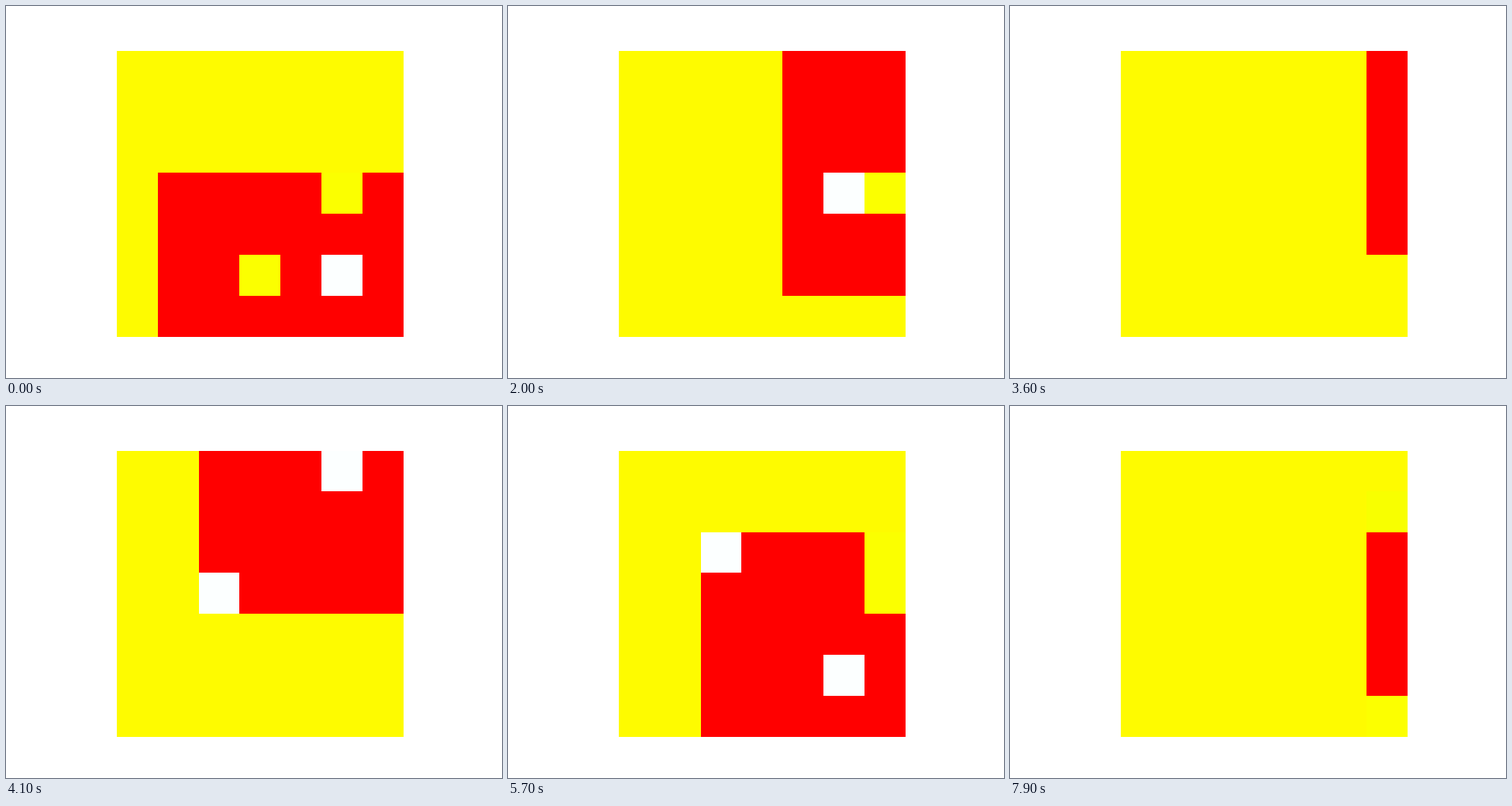
An HTML page with a canvas for the animation above (8000 ms loop, 640 by 480 pixels).

```html
<!DOCTYPE html>
<html>
<head>
<meta charset="utf-8">
<style>
html, body { margin: 0; width: 100%; height: 100%; overflow: hidden; background: #fff; }
canvas { display: block; }
</style>
</head>
<body>
<canvas id="stage" width="640" height="480"></canvas>
<script>
// An agent walks a 6x6 room; the picture is its 7x7 view, facing left from the middle of the right edge.
const ctx = document.getElementById('stage').getContext('2d');
const STEP = 100, STEPS = 80, ROOM = 6;
const COLUMNS = [143, 196, 249, 301, 354, 407, 460, 513];
const ROWS = [58, 110, 163, 215, 268, 321, 374, 427];
const COLORS = {
  wall: '#fefb00', floor: '#ff0000', key: '#fbff00',
  goal: '#f8ff00', door: '#fcffff', open: '#fcff00'
};
const HEADINGS = [[1, 0], [0, 1], [-1, 0], [0, -1]];

// Moves: f forward, l / r turn, p pick up, t open a door, . nothing
const EPISODES = [
  { start: 0, moves: 'prffl.rfflfftflfpflftlffflff',
    things: { '2,1': 'key', '4,3': 'key', '2,3': 'door', '4,5': 'door', '6,6': 'goal' } },
  { start: 29, moves: 'frffffflf',
    things: { '6,6': 'goal' } },
  { start: 39, moves: 'rffflffffplfl.lffrfffflt' + 'lfrflffplfftllff',
    things: { '6,4': 'key', '5,6': 'key', '4,3': 'door', '1,6': 'door', '6,6': 'goal' } }
];

function play(step) {
  const { start, moves, things } = EPISODES.filter(e => e.start <= step).pop();
  const agent = { x: 1, y: 1, heading: 0, carried: null, things: { ...things } };
  for (const move of moves.slice(0, step - start)) {
    const [dx, dy] = HEADINGS[agent.heading];
    const ahead = [agent.x + dx, agent.y + dy];
    if (move === 'f') [agent.x, agent.y] = ahead;
    if (move === 'l') agent.heading = (agent.heading + 3) % 4;
    if (move === 'r') agent.heading = (agent.heading + 1) % 4;
    if (move === 'p') {
      agent.carried = agent.things[ahead];
      delete agent.things[ahead];
    }
    if (move === 't') {
      agent.things[ahead] = 'open';
      agent.carried = null;
    }
  }
  return agent;
}

function cellAt(agent, forward, right) {
  if (!forward && !right) return agent.carried || 'floor';
  const [dx, dy] = HEADINGS[agent.heading];
  const x = agent.x + forward * dx - right * dy;
  const y = agent.y + forward * dy + right * dx;
  if (Math.min(x, y) < 1 || Math.max(x, y) > ROOM) return 'wall';
  return agent.things[[x, y]] || 'floor';
}

function draw(step) {
  const agent = play(step);
  for (let row = 0; row < 7; row++) {
    for (let col = 0; col < 7; col++) {
      const x = COLUMNS[col], y = ROWS[row];
      ctx.fillStyle = COLORS[cellAt(agent, 6 - col, row - 3)];
      ctx.fillRect(x, y, COLUMNS[col + 1] - x, ROWS[row + 1] - y);
    }
  }
}

const began = performance.now();
function tick() {
  draw(Math.floor((performance.now() - began) / STEP) % STEPS);
  requestAnimationFrame(tick);
}
tick();
</script>
</body>
</html>
```
